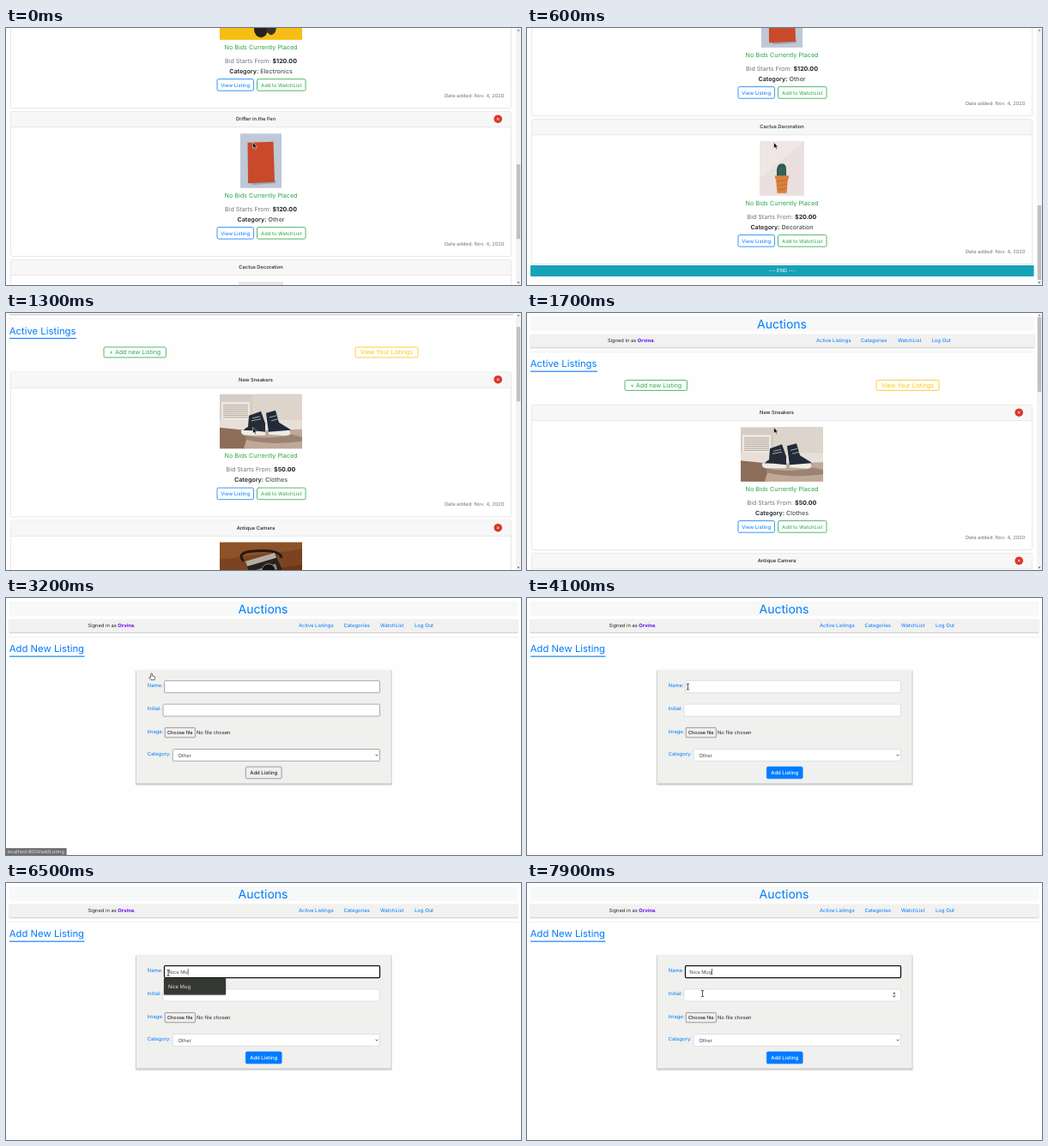
An HTML page that plays this animation: 600 px wide and 300 px high, repeating every 8000 ms.

```html
<!DOCTYPE html>
<html lang="en">
<head>
<meta charset="utf-8">
<title>Auctions</title>
<style>
html, body { margin: 0; width: 100%; height: 100%; overflow: hidden; background: #fefefe; }
svg { display: block; width: 600px; height: 300px; }
text { font-family: Inter, "Open Sans", sans-serif; text-rendering: geometricPrecision; white-space: pre; }
.menu text, .status text { font-family: "Noto Sans", "Open Sans", sans-serif; }
</style>
</head>
<body>
<svg id="stage" viewBox="0 0 600 300" xmlns="http://www.w3.org/2000/svg"></svg>
<script>
const BLUE = '#007bff', GREEN = '#28a745', AMBER = '#ffc107', DARK = '#212529', GREY = '#6c757d';
const LOOP = 8000, STEP = 100, PITCH = 173, FIRST = 107, MAX_SCROLL = 693;

const rect = (x, y, w, h, fill, extra = '') =>
  `<rect x="${x}" y="${y}" width="${w}" height="${h}" fill="${fill}" ${extra}/>`;
const path = (d, fill, extra = '') => `<path d="${d}" fill="${fill}" ${extra}/>`;
const label = (x, y, str, size, fill = DARK, extra = '') =>
  `<text x="${x}" y="${y}" font-size="${size}" fill="${fill}" ${extra}>${str}</text>`;
const mid = (x, y, str, size, fill, extra = '') =>
  label(x, y, str, size, fill, `text-anchor="middle" ${extra}`);
const group = (body, extra = '') => `<g ${extra}>${body}</g>`;
const line = (color, w = 0.7) => `stroke="${color}" stroke-width="${w}"`;

function outlineButton(x, y, w, h, str, size, color, id = '') {
  return group(rect(x, y, w, h, '#fff', `rx="1.6" ${line(color, 0.8)}`) +
    mid(x + w / 2, y + h / 2 + size * 0.36, str, size, color), id && `id="${id}"`);
}

// Product pictures, drawn in their own box of height 63.5
const pictures = {
  sneakers: [96,
    rect(0, 0, 96, 63.5, '#d5ccc3') +
    rect(38, 0, 58, 33, '#ddd4cb') +
    rect(0, 30, 96, 12, '#e6e0d9') +
    rect(2, 9, 33, 21, '#eee9e2') +
    Array.from({ length: 7 }, (_, i) => rect(4, 12 + i * 2.4, 29, 1.1, '#b4a99c')).join('') +
    path('M0 39L38 43L30 63.5H0Z', '#8d6d58') +
    path('M34 43L96 41V63.5H28Z', '#bfa896') +
    path('M30 48Q55 54 84 47L96 50V55Q60 60 30 53Z', '#9a8373') +
    path('M34 25L48 20L53 34L53 46L28 47Q25 42 33 38Z', '#252c38') +
    path('M54 22L65 19L69 33L82 41Q84 46 78 47L57 45Z', '#202a39') +
    path('M25 42Q38 42 53 44V48H29Q24 47 25 42Z', '#efebe5') +
    path('M57 44L82 42Q84 48 77 48.5L57 47Z', '#efebe5') +
    path('M38 28L47 26M37 31L48 29M58 27L66 25M60 31L68 29', 'none', line('#c9c8c6', 0.8))],
  camera: [96,
    rect(0, 0, 96, 63.5, '#7b431f') +
    path('M0 0H96V8L0 20Z', '#8d5228') +
    path('M0 40L96 26V34L0 49Z', '#693617') +
    path('M28 22Q18 11 42 10Q70 8 72 18', 'none', line('#1f1a18', 3)) +
    path('M30 22L64 12L76 39L39 51Z', '#26221f') +
    path('M30 22L64 12L66 18L32 28Z', '#b5aca2') +
    path('M36 34L65 25L67 31L39 40Z', '#8f867e') +
    '<circle cx="57" cy="33" r="8" fill="#141313" stroke="#8c8780"/>'],
  headphones: [96,
    rect(0, 0, 96, 63.5, '#f6bd12') +
    path('M32 44Q24 8 50 9Q72 9 64 42', 'none', line('#221e19', 4)) +
    '<ellipse cx="48" cy="51" rx="8" ry="10" fill="#26211c"/><ellipse cx="60" cy="48" rx="6" ry="10" fill="#39312b"/>'],
  book: [48,
    rect(0, 0, 48, 63.5, '#bec8d6') +
    path('M10 56L41 54V58L14 60Z', '#9aa5b3') +
    path('M8.5 10.5L38.5 9.5L40 56.5L9 58Z', '#c84a2b')],
  cactus: [52,
    rect(0, 0, 52, 63.5, '#eadfdf') +
    path('M0 0H52L0 44Z', '#efe6e5') +
    path('M20 42V33Q21 26 26 26Q31 26 31 33V42Z', '#28584f') +
    path('M23.5 41V31M26 41V28M28.5 41V31', 'none', line('#4f8172', 0.6)) +
    path('M18 40H34V44H33L31.5 60.5H20.5L19 44H18Z', '#d8813d') +
    path('M20 47L32 45M20.5 52L32 50M21 57L31.5 55', 'none', line('#b9622a', 0.7))]
};

const items = [
  ['New Sneakers', 'sneakers', '$50.00', 'Clothes', true],
  ['Antique Camera', 'camera', '$80.00', 'Electronics', true],
  ['New Headphones', 'headphones', '$120.00', 'Electronics', true],
  ['Drifter in the Fen', 'book', '$120.00', 'Other', true],
  ['Cactus Decoration', 'cactus', '$20.00', 'Decoration', false]
];

function card([title, pic, price, kind, own], i) {
  const [w, art] = pictures[pic];
  const remove = '<circle cx="573.2" cy="9.2" r="4.8" fill="#dc3529"/>' +
    path('M571.9 7.9L574.5 10.5M574.5 7.9L571.9 10.5', 'none', line('#fff', 0.8));
  return group(
    rect(5.5, 0.5, 583, 169, '#fff', `rx="1.6" ${line('#dfdfdf')}`) +
    rect(5.9, 0.9, 582.2, 17.8, '#f7f7f7') + rect(5.9, 18.4, 582.2, 0.7, '#dfdfdf') +
    mid(own ? 291 : 297, 11.3, title, 5.8, DARK, 'font-weight="500"') + (own ? remove : '') +
    group(art, `transform="translate(${297 - w / 2} 26.3)"`) +
    mid(297, 100.6, 'No Bids Currently Placed', 7.2, GREEN) +
    mid(297, 116.5, `Bid Starts From: <tspan font-weight="700" fill="${DARK}">${price}</tspan>`, 7.1, GREY) +
    mid(297, 128.6, `<tspan font-weight="600">Category:</tspan> <tspan font-weight="500" fill="#495057">${kind}</tspan>`, 7.1, DARK) +
    outlineButton(246, 135.6, 42.4, 13.6, 'View Listing', 5.95, BLUE) +
    outlineButton(292.5, 135.6, 56.5, 13.6, 'Add to WatchList', 5.9, GREEN) +
    label(580.5, 156.8, 'Date added: Nov. 4, 2020', 5.75, GREY, 'text-anchor="end"'),
    `transform="translate(0 ${FIRST + PITCH * i})"`);
}

function header(right, signX, links) {
  const names = ['Active Listings', 'Categories', 'WatchList', 'Log Out'];
  return rect(4, 4, right - 4, 17, '#f6f9f8') +
    mid((right + 3) / 2, 18, 'Auctions', 14, BLUE) +
    rect(3.5, 25.3, right - 3, 16, '#d4d4d4', 'rx="1"') +
    rect(3.5, 24.5, right - 3, 15.4, '#f1f1f0', 'rx="1"') +
    label(signX, 33.7, `Signed in as <tspan font-weight="700" fill="#6610f2">Orvina</tspan>.`, 5.75) +
    names.map((n, i) => label(links[i], 33.7, n, 5.9, BLUE)).join('') +
    rect(3, 45, right - 2, 0.6, '#e6e6e6');
}

const heading = (str, w) => label(3.8, 63, str, 11.3, BLUE) + rect(4, 67.6, w, 1.1, BLUE);

const listing = group(
  group(header(591, 94, [337, 389, 432, 471.5]) + heading('Active Listings', 78) +
    rect(112.5, 77, 75, 15, 'rgba(40,167,69,.5)', 'id="ring" rx="2.5"') +
    outlineButton(114, 78.4, 72.4, 12, '+ Add new Listing', 7.05, GREEN, 'add') +
    outlineButton(407, 78.4, 73, 12, 'View Your Listings', 7.05, AMBER) +
    items.map(card).join('') +
    rect(4, 970, 586.6, 13, '#17a2b8', 'rx="1"') +
    mid(297, 978.4, '--- END ---', 5.8, '#fff'), 'id="doc"') +
  rect(594, 0, 6, 300, '#f3f3f3') +
  rect(594.8, 5, 4.4, 87, '#c1c1c1', 'id="thumb"') +
  path('M595.6 3.4L597 1.6L598.4 3.4Z', '#777') + path('M595.6 296.4L597 298.2L598.4 296.4Z', '#444'),
  'id="listing"');

const field = (x, y, w, h, id = '') =>
  rect(x, y, w, h, '#fff', `class="field" rx="1.3" ${id && `id="${id}"`} ${line('#8a8a8a')}`);
const fieldName = (y, str) => label(164.8, y, str, 5.85, BLUE);

const form = group(
  header(596, 95.5, [341, 393.5, 436, 476]) + heading('Add New Listing', 87.5) +
  [3, 2, 1].map(i => rect(152 - i / 2, 84.5 - i / 4, 296.5 + i, 132.5 + i, 'rgba(0,0,0,.07)', 'rx="1.5"')).join('') +
  rect(152, 83.7, 296.5, 132.6, '#f0f0ee', 'rx="1"') +
  fieldName(103.6, 'Name:') + field(184.5, 96.6, 251, 14, 'name') +
  fieldName(131.2, 'Initial:') + field(183, 124, 252.5, 14) +
  path('M426 129.4L427.8 127.2L429.6 129.4ZM426 131.4L427.8 133.6L429.6 131.4Z', '#555', 'id="spin"') +
  fieldName(157.8, 'Image:') +
  rect(185.2, 151.4, 35.2, 11.4, '#efefef', `rx="0.8" ${line('#767676')}`) +
  mid(202.8, 159.1, 'Choose file', 5.5, '#000') +
  label(222, 159.1, 'No file chosen', 5.8) +
  fieldName(184.2, 'Category:') + field(194.3, 176.5, 241.2, 13.8) +
  label(200.4, 185.5, 'Other', 5.85, '#495057') +
  path('M430.5 182.7L432 184.2L433.5 182.7', 'none', line('#333', 0.8)) +
  rect(279.3, 197, 41.8, 13.8, '#efefef', 'id="submit" rx="1.6"') +
  mid(300.2, 206, 'Add Listing', 5.95, DARK, 'id="submitText" font-weight="500"') +
  label(189.2, 105.7, '', 5.75, '#495057', 'id="typed"') +
  rect(189, 100, 0.6, 7.2, '#111', 'id="caret"') +
  group('', 'id="menu" class="menu"'), 'id="form"');

const status = group(rect(0, 292, 70.6, 8, '#6e6e6e') +
  label(1.5, 298, 'localhost:8000/addListing', 5.5, '#e4e4e4'), 'id="status" class="status"');

const pointers = {
  arrow: path('M0 0V7L1.7 5.6L2.9 8.1L4 7.6L2.9 5.2H5Z', '#111', line('#fff', 0.5)),
  hand: path('M-.8 .4Q0 -.5 .8 .4V3L3.6 3.6Q4.4 4 4.2 5L3.4 7.6H-.6L-2.8 4.6Q-2.6 3.6 -.8 4.8Z', '#fff', line('#333', 0.7)),
  beam: path('M-1.6 -3.6Q0 -3.6 0 -2.8Q0 -3.6 1.6 -3.6M0 -3V3M-1.6 3.6Q0 3.6 0 2.8Q0 3.6 1.6 3.6', 'none', line('#222', 0.8))
};
const cursor = group(Object.keys(pointers).map(k => group(pointers[k], `id="${k}"`)).join(''), 'id="cursor"');

document.getElementById('stage').innerHTML = rect(0, 0, 600, 300, '#fefefe') + listing + form + status + cursor;

const el = id => document.getElementById(id);
const set = (node, attrs) => { for (const k in attrs) node.setAttribute(k, attrs[k]); };
const show = (id, on) => set(el(id), { visibility: on ? 'visible' : 'hidden' });
const display = (id, on) => { el(id).style.display = on ? '' : 'none'; };
const last = (steps, t) => steps.filter(s => s[0] <= t).pop();
const clamp = v => Math.min(1, Math.max(0, v));

const scrolls = [[0, 529], [100, 600], [200, 672], [400, 680], [500, 689], [600, MAX_SCROLL],
  [1000, 600], [1100, 390], [1200, 150], [1300, 38.5], [1400, 18], [1500, 8], [1600, 2], [1700, 0]];
const typing = [[4300, ''], [5100, 'N'], [5200, 'Ni'], [5300, 'Nic'], [5500, 'Nice'],
  [5700, 'Nice '], [6300, 'Nice M'], [6500, 'Nice Mu'], [6700, 'Nice Mug']];
const moves = [[1800, 2700, 169.5, 88], [3600, 4300, 189, 105], [7400, 7900, 204.5, 129]];
const saved = ['New Sneakers', 'None', 'New Headphones', 'Nice Mug', 'Cactus Decoration', 'Antique Camera'];

function pointerAt(t) {
  let x = 287.5, y = 133.5;
  for (const [from, to, px, py] of moves) {
    const p = clamp((t - from) / (to - from)), e = 1 - (1 - p) ** 2;
    x += (px - x) * e;
    y += (py - y) * e;
  }
  return [x, y];
}

function drawMenu(text, open) {
  const hits = open ? saved.filter(s => s.startsWith(text) && s !== text) : [];
  const w = text ? 72 : 84, h = hits.length * 13.5 + 6;
  el('menu').innerHTML = hits.length ? rect(183.4, 111, w + 1.2, h + 0.8, 'rgba(0,0,0,.22)', 'rx="1.5"') +
    rect(184, 111, w, h, '#363834', 'rx="1"') +
    hits.map((s, i) => label(188.8, 122.9 + i * 13.5, s, 5.9, '#e9e9e4')).join('') : '';
}

function draw(t) {
  const onForm = t >= 3200, styled = t >= 3300, focused = t >= 4300;
  const [x, y] = pointerAt(t);
  display('listing', !onForm);
  display('form', onForm);

  const s = last(scrolls, t)[1];
  set(el('doc'), { transform: `translate(0 ${-s})` });
  set(el('thumb'), { y: 5 + s * 202 / MAX_SCROLL });

  const hover = !onForm && x > 114 && x < 186 && y > 78 && y < 90.4 && t > 1900;
  const [box, word] = el('add').children;
  set(box, { fill: hover ? GREEN : '#fff' });
  set(word, { fill: hover ? '#fff' : GREEN });
  show('ring', t >= 2800);
  show('status', t >= 2700 && !styled);

  document.querySelectorAll('.field').forEach(f => set(f, { stroke: styled ? '#d3d7dc' : '#8a8a8a' }));
  if (focused) set(el('name'), { stroke: '#111', 'stroke-width': 1.3 });
  else set(el('name'), { 'stroke-width': 0.7 });
  set(el('submit'), { fill: styled ? BLUE : '#efefef', stroke: styled ? BLUE : '#767676', 'stroke-width': 0.7 });
  set(el('submitText'), { fill: styled ? '#fff' : DARK });

  const [keyTime, text] = last(typing, t) || [0, ''];
  const typed = el('typed');
  typed.textContent = text;
  set(el('caret'), { x: 189.2 + (text && onForm ? typed.getComputedTextLength() : 0) });
  el('caret').style.display = focused && (t - keyTime) % 1200 < 600 ? '' : 'none';
  drawMenu(text, focused);
  display('spin', onForm && y > 124);

  const inField = x > 184 && ((y > 96 && y < 111) || (y > 124 && y < 138));
  const kind = onForm ? (!styled ? 'hand' : inField ? 'beam' : 'arrow') : hover ? 'hand' : 'arrow';
  for (const k in pointers) display(k, k === kind);
  set(el('cursor'), { transform: `translate(${x} ${y})` });
}

const start = performance.now();
function tick() {
  const t = (performance.now() - start) % LOOP;
  draw(Math.floor(t / STEP) * STEP);
  requestAnimationFrame(tick);
}
tick();
</script>
</body>
</html>
```
